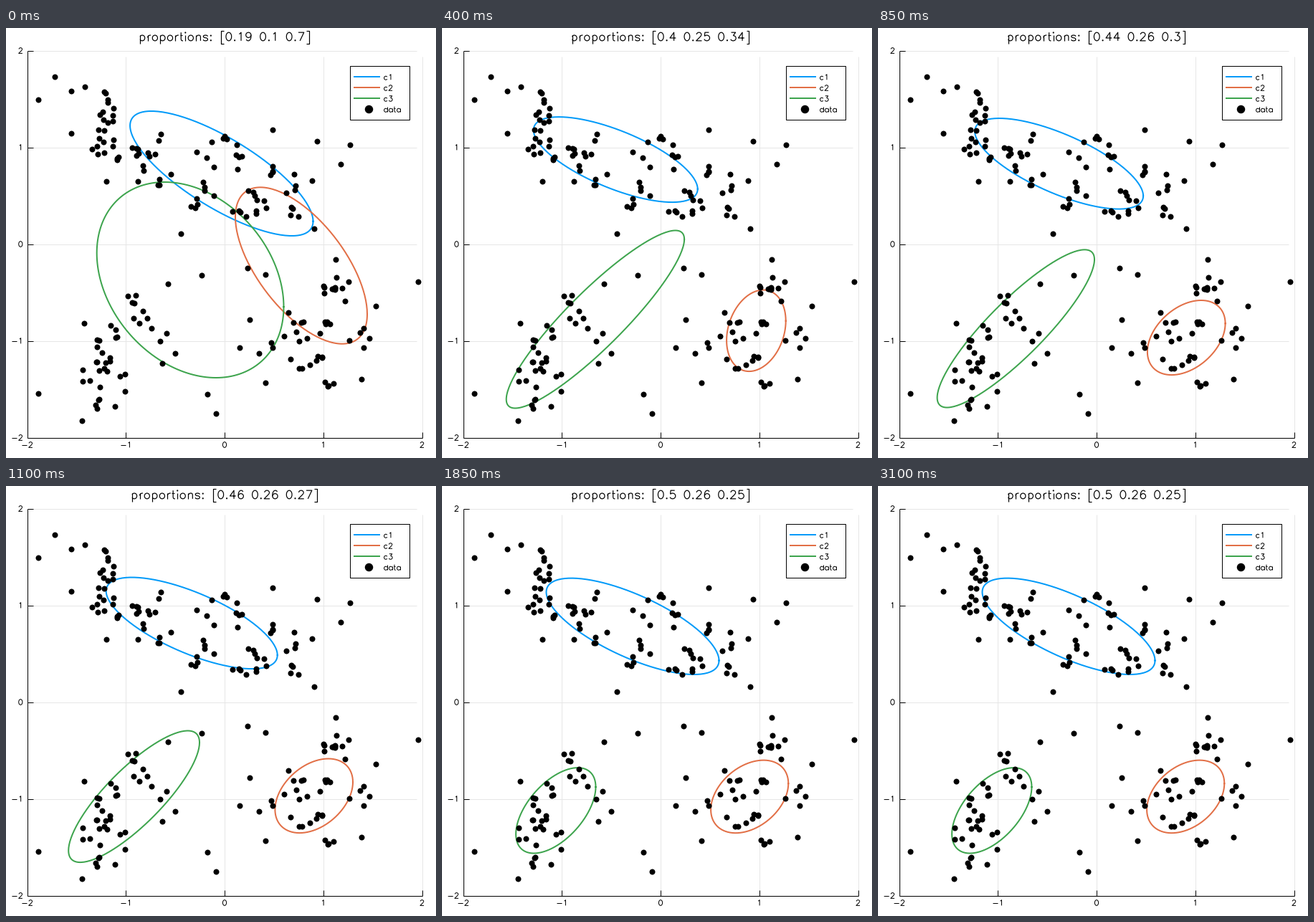
Write a matplotlib script that moves like this. It is 600 px wide and 600 px high and loops after 5 s.

```python
import numpy as np
import matplotlib.pyplot as plt
from matplotlib.animation import FuncAnimation
from matplotlib.collections import LineCollection
from matplotlib.patches import Rectangle

SIZE, DPI, STEP, LOOP = 600, 100, 50, 5000
PX = 72 / DPI
LEFT, RIGHT, TOP, BOTTOM = 29.5, 580.5, 31.5, 571.5
TICK = 8
COLORS = ["#009af9", "#e26f46", "#3da44d"]


# Single-stroke lettering: baseline at 0, capitals 21 units high.
def path(*xy):
    return np.array(xy, float).reshape(-1, 2)


def arc(cx, cy, rx, ry, start=0, stop=360):
    a = np.radians(np.linspace(start, stop, 25))
    return np.column_stack([cx + rx * np.cos(a), cy + ry * np.sin(a)])


def dot(x, y):
    return arc(x, y, 0.9, 0.9)


GLYPHS = {" ": (16, [])}


def glyph(char, width, *strokes):
    GLYPHS[char] = (width, strokes)


bowl = arc(9.5, 7, 6.5, 7, 148, -148)
back = path(19, 0) + bowl * [-1, 1]
glyph("p", 19, path(4, 14, 4, -7), bowl)
glyph("d", 19, path(15, 21, 15, 0), back)
glyph("a", 19, path(15, 14, 15, 0), back)
glyph("o", 19, arc(9.5, 7, 6.5, 7))
glyph("c", 18, arc(9.5, 7, 6.5, 7, 35, 325))
glyph("r", 13, path(4, 14, 4, 0), arc(11, 8, 7, 6, 180, 82))
glyph("t", 12, path(5, 21, 5, 4, 6, 1, 8, 0, 10, 0), path(2, 14, 9, 14))
glyph("i", 8, path(4, 14, 4, 0), dot(4, 20.5))
glyph("n", 19, path(4, 14, 4, 0),
      path(4, 10, 7, 13, 9, 14, 12, 14, 14, 13, 15, 10, 15, 0))
glyph("s", 17, path(14, 11, 13, 13, 10, 14, 7, 14, 4, 13, 3, 11, 4, 9, 6, 8,
                    11, 7, 13, 6, 14, 4, 14, 3, 13, 1, 10, 0, 7, 0, 4, 1, 3, 3))
glyph(":", 10, dot(5, 13), dot(5, 1))
glyph(".", 10, dot(5, 1))
glyph("-", 26, path(4, 9, 22, 9))
glyph("[", 14, path(11, 25, 4, 25, 4, -7, 11, -7))
glyph("]", 14, path(3, 25, 10, 25, 10, -7, 3, -7))
glyph("0", 20, arc(10, 10.5, 7, 10.5))
glyph("1", 20, path(6, 17, 8, 18, 11, 21, 11, 0))
glyph("2", 20, arc(10, 15.5, 6, 5.5, 175, -30), path(15.2, 12.8, 13, 10, 3, 0, 17, 0))
glyph("3", 20, path(5, 21, 16, 21, 10, 13), arc(10, 6.5, 7, 6.5, 90, -155))
glyph("4", 20, path(13, 0, 13, 21, 3, 7, 18, 7))
glyph("5", 20, path(15, 21, 5, 21, 4, 12), arc(9.7, 7, 7.3, 7, 140, -155))
six = [arc(10.5, 6.5, 6.5, 6.5), arc(11, 10, 7, 11, 45, 200)]
glyph("6", 20, *six)
glyph("7", 20, path(3, 21, 17, 21, 7, 0))
glyph("8", 20, arc(10, 17, 5, 4), arc(10, 6.5, 7, 6.5))
glyph("9", 20, *[path(20, 21) - s for s in six])


def write(text, x, y, scale, align=0.0):
    """Strokes of text centred on y; align 0 / 0.5 / 1 is left / centre / right."""
    x -= align * scale * sum(GLYPHS[c][0] for c in text)
    base = y + 10.5 * scale
    out = []
    for c in text:
        width, strokes = GLYPHS[c]
        out += [path(x, base) + s * [scale, -scale] for s in strokes]
        x += width * scale
    return out


# Key times; each component holds centre x, y, half extents and correlation.
TIMES = [0, 400, 600, 1100, 1450, 1700]
ELLIPSES = [
    np.array([[300.8, 203, 127.7, 87, .767], [242.2, 183.6, 114.5, 59.5, .69],
              [246, 187.3, 115.5, 62.8, .72], [259.2, 191.3, 119.5, 63.8, .70],
              [265.4, 195.1, 120.3, 66.5, .71], [266, 195.8, 120.5, 67.2, .71]]),
    np.array([[412, 331.5, 92, 109.2, .62], [438.4, 422.3, 41.3, 56.8, -.24],
              [430.8, 431.8, 54.4, 52.3, -.39], [429.7, 432.3, 54.3, 51.8, -.37],
              [429.2, 432.9, 54.1, 51.3, -.36], [429.2, 433.4, 54.1, 50.8, -.36]]),
    np.array([[257.1, 351.5, 130.4, 136.5, .275], [213.9, 406.5, 124.2, 124, -.9],
              [206, 405.6, 128, 128.4, -.93], [178.6, 433.3, 91.4, 91.8, -.82],
              [158.8, 452.8, 55.7, 59.7, -.55], [158.8, 452.8, 55.7, 59.7, -.55]]),
]
SHARES = np.array([[.192, .104, .704], [.404, .252, .344], [.418, .261, .321],
                   [.464, .263, .273], [.492, .257, .251], [.497, .256, .247]])


def at(t, keys):
    return [np.interp(t, TIMES, column) for column in keys.T]


def outline(cx, cy, rx, ry, corr):
    a = np.linspace(0, 2 * np.pi, 181)
    return cx + rx * np.cos(a), cy + ry * np.cos(a - np.arccos(corr))


# Lone points, then cluster cores that each gather a few seeded neighbours.
LONE = path(68, 68, 110, 82, 45, 100, 91, 88, 91, 147, 140, 214, 244, 287,
            216, 148, 372, 142, 434, 158, 480, 163, 467, 190, 427, 213,
            575, 354, 516, 388, 460, 323, 430, 280, 337, 335, 362, 344,
            340, 407, 326, 446, 496, 490, 499, 446, 281, 511, 293, 538,
            362, 495, 45, 510, 106, 548, 152, 528, 218, 468, 273, 345, 226, 357)
CORES = path(142, 100, 136, 128, 149, 122, 150, 156, 155, 182, 137, 174,
             182, 168, 198, 174, 191, 192, 214, 211, 264, 251, 280, 181,
             308, 155, 325, 180, 277, 227, 372, 193, 363, 251, 347, 234,
             327, 257, 397, 261, 403, 226, 478, 354, 459, 365, 444, 370,
             401, 411, 452, 413, 420, 433, 372, 446, 441, 459, 409, 475,
             450, 499, 494, 425, 170, 374, 191, 395, 215, 437, 127, 435,
             155, 431, 145, 460, 137, 475, 107, 493, 130, 518, 166, 507)
rng = np.random.default_rng(7)
near = np.repeat(CORES, 3, axis=0)
near = near + rng.normal(0, 11, near.shape)
points = np.vstack([LONE, CORES, near]) + 0.3

fig = plt.figure(figsize=(SIZE / DPI, SIZE / DPI), dpi=DPI, facecolor="white")
ax = fig.add_axes([0, 0, 1, 1])
ax.set(xlim=(0, SIZE), ylim=(SIZE, 0))
ax.axis("off")


def line(x0, y0, x1, y1, color="black", width=1.0, z=2):
    ax.plot([x0, x1], [y0, y1], color=color, lw=width * PX, zorder=z,
            solid_capstyle="butt")


def lettering(strokes, width, z=8):
    return ax.add_collection(LineCollection(
        strokes, colors="black", linewidths=width * PX, zorder=z))


labels = []
for k in range(5):
    x = LEFT + k * (RIGHT - LEFT) / 4
    y = BOTTOM - k * (BOTTOM - TOP) / 4
    line(x, TOP + TICK, x, BOTTOM, "#e6e6e6", z=1)
    line(LEFT, y, RIGHT - TICK, y, "#e6e6e6", z=1)
    line(x, BOTTOM, x, BOTTOM - TICK)
    line(LEFT, y, LEFT + TICK, y)
    labels += write(str(k - 2), x, 581.5, 0.37, 0.5)
    labels += write(str(k - 2), 24, y, 0.37, 1)
line(LEFT, TOP, LEFT, BOTTOM)
line(LEFT, BOTTOM, RIGHT, BOTTOM)

curves = [ax.plot([], [], color=c, lw=2 * PX, zorder=3)[0] for c in COLORS]
ax.plot(*points.T, "o", color="black", ms=8 * PX, mew=0, zorder=4)

ax.add_patch(Rectangle((479.5, 52.5), 83, 75, fc="white", ec="black",
                       lw=PX, zorder=6))
for k, name in enumerate(["c1", "c2", "c3", "data"]):
    y = 68 + 15 * k
    if k < 3:
        line(485, y, 521.5, y, COLORS[k], 2, z=7)
    else:
        ax.plot(506.3, y + 0.3, "o", color="black", ms=11.5 * PX, mew=0, zorder=7)
    labels += write(name, 526.5, y + 0.5, 0.36)
lettering(labels, 1)
title = lettering([], 1.2)


def update(i):
    t = i * STEP
    for curve, keys in zip(curves, ELLIPSES):
        curve.set_data(*outline(*at(t, keys)))
    shares = " ".join(str(round(float(s), 2)) for s in at(t, SHARES))
    title.set_segments(write(f"proportions: [{shares}]", 305, 12, 0.555, 0.5))
    return [*curves, title]


anim = FuncAnimation(fig, update, frames=LOOP // STEP, interval=STEP,
                     repeat=True, repeat_delay=0)
plt.show()
```
